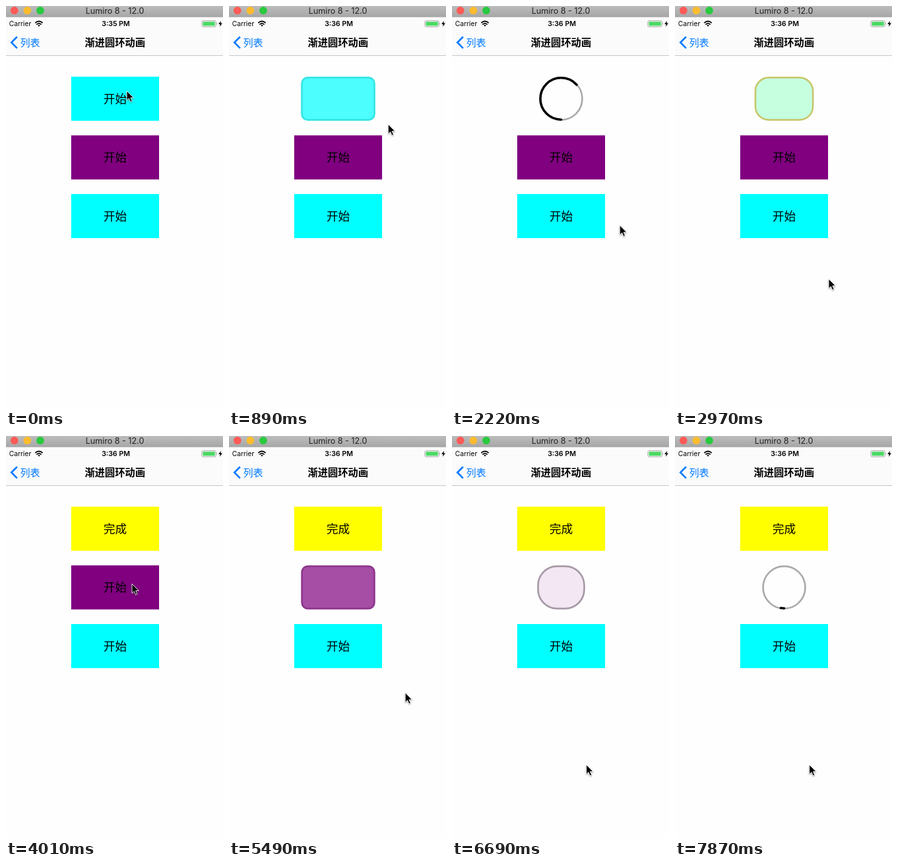
Animation of 336 by 620 pixels, one loop 8 s. Source, as an HTML page:

```html
<!DOCTYPE html>
<html lang="zh">
<head>
<meta charset="utf-8">
<style>
html, body { margin: 0; width: 100%; height: 100%; overflow: hidden; background: #fefefe; }
svg { display: block; width: 336px; height: 620px; }
text { font-family: Inter, "Noto Sans CJK SC", "Noto Sans CJK", sans-serif; text-anchor: middle; }
.label { font-size: 18px; }
#cursor { filter: drop-shadow(0 1px 1px #0006); }
</style>
</head>
<body>
<svg viewBox="0 0 336 620">
  <defs>
    <linearGradient id="bar" x2="0" y2="1">
      <stop stop-color="#bcbcbc"/><stop offset="1" stop-color="#a6a6a6"/>
    </linearGradient>
  </defs>
  <rect width="336" height="620" fill="#fefefe"/>

  <!-- window title -->
  <rect width="336" height="17.5" fill="url(#bar)"/>
  <circle cx="13" cy="7" r="6" fill="#fc5b57"/>
  <circle cx="33" cy="7" r="6" fill="#fdbc2f"/>
  <circle cx="53" cy="7" r="6" fill="#29c940"/>
  <text x="168.5" y="12" font-size="12.8" fill="#222">Lumiro 8 - 12.0</text>

  <!-- status and navigation bars -->
  <rect y="17.5" width="336" height="59" fill="#fbfbfb"/>
  <path d="M0 76.5H336" stroke="#c6c6c6"/>
  <text x="22" y="31" font-size="10.5">Carrier</text>
  <g fill="none" stroke="#000" stroke-width="1.8">
    <path d="M45.2 26.2Q51 20.8 56.8 26.2M47.3 28.6Q51 25.2 54.7 28.6"/>
    <path d="M49.2 29.8Q51 28.4 52.8 29.8L51 31.7Z" fill="#000" stroke="none"/>
  </g>
  <text id="clock" x="170" y="31" font-size="10.8" font-weight="600"></text>
  <rect x="303.2" y="22.7" width="22" height="9.4" rx="2.3" fill="none" stroke="#9a9a9a" stroke-width=".9"/>
  <rect x="304.8" y="24.2" width="18.8" height="6.4" rx="1" fill="#4cd964"/>
  <path d="M326.4 25.7Q328 27.3 326.4 29Z" fill="#9a9a9a"/>
  <path d="M333 22.8L329 28H331.6L330.8 32L335 26.6H332.3Z"/>
  <path d="M17.2 47.5L8.4 56.3L17.2 65.1" fill="none" stroke="#007aff" stroke-width="2.7"/>
  <text x="37.3" y="62" font-size="15.3" fill="#007aff">列表</text>
  <text x="168.7" y="62" font-size="15.6" font-weight="700">渐进圆环动画</text>

  <g id="buttons"></g>
  <path id="cursor" d="M0 0V14.6L3.4 11.5L5.8 17L8.3 15.9L5.9 10.6H10.6Z" stroke="#fff" stroke-width=".9"/>
</svg>
<script>
const LOOP = 8000, STEP = 148.5;
const SIZE = 68, BORDER = 2.7, CX = 169;
const CYAN = [0, 255, 255], PURPLE = [128, 0, 128], YELLOW = [255, 255, 0], GRAY = [170, 170, 170];
const $ = id => document.getElementById(id);

const buttons = [
  { y: 109, color: CYAN, press: 470, span: 1095, ring: 1500, ringSpan: 1000, grow: 2520 },
  { y: 199.5, color: PURPLE, press: 4355, span: 2950, ring: 7530, ringSpan: 2950, grow: Infinity },
  { y: 290, color: CYAN, press: Infinity, span: 1, ring: Infinity, ringSpan: 1, grow: Infinity }
];

// time, x, y of the pointer tip
const pointer = [
  [0, 187, 131], [440, 187, 131], [742, 268, 165], [1040, 225, 200], [1336, 172, 227],
  [1500, 172, 227], [1930, 270, 300], [2400, 238, 421], [2970, 238, 421], [3416, 245, 310],
  [3712, 207, 235], [4009, 195, 228], [4455, 195, 228], [4800, 304, 290], [5346, 273, 396],
  [5494, 273, 396], [6080, 208, 507], [LOOP, 208, 507]
];

const clamp = v => Math.min(1, Math.max(0, v));
const lerp = (a, b, p) => a + (b - a) * p;
const mix = (a, b, p) => a.map((v, i) => lerp(v, b[i], p));
const rgba = (c, a = 1) => `rgba(${c.map(Math.round)},${a})`;

// cubic-bezier(.42, 0, .58, 1)
function ease(x) {
  let lo = 0, hi = 1, s = .5;
  for (let i = 0; i < 20; i++) {
    const r = 1 - s;
    if (1.26 * r * r * s + 1.74 * r * s * s + s ** 3 < x) lo = s; else hi = s;
    s = (lo + hi) / 2;
  }
  return s * s * (3 - 2 * s);
}
const progress = (t, start, span) => t < start ? 0 : ease(clamp((t - start) / span));

function setAttrs(el, attrs) {
  for (const key in attrs) el.setAttribute(key, attrs[key]);
}
function add(tag, attrs) {
  const el = document.createElementNS("http://www.w3.org/2000/svg", tag);
  setAttrs(el, attrs);
  return $("buttons").appendChild(el);
}

for (const b of buttons) {
  const cy = b.y + SIZE / 2;
  b.box = add("rect", { y: b.y + BORDER / 2, height: SIZE - BORDER, "stroke-width": BORDER });
  b.arc = add("circle", {
    cx: CX, cy, r: 32.2, pathLength: 1, fill: "none", stroke: "#000",
    "stroke-width": 3.6, "stroke-linecap": "round", transform: `rotate(90 ${CX} ${cy})`
  });
  b.label = add("text", { x: CX, y: cy + 6.6, class: "label" });
}

function drawButton(b, t) {
  const growing = t >= b.grow;
  const p = growing ? 1 - progress(t, b.grow, b.span) : progress(t, b.press, b.span);
  const done = growing && p < .0001;
  const width = SIZE * (2 - p);
  const fill = growing ? mix(YELLOW, b.color, p) : b.color;
  setAttrs(b.box, {
    x: CX - width / 2 + BORDER / 2,
    width: width - BORDER,
    rx: Math.max(0, p * SIZE / 2 - BORDER / 2),
    fill: rgba(fill, 1 - p),
    stroke: rgba(mix(growing ? YELLOW : b.color, GRAY, p))
  });
  const arc = growing ? 0 : progress(t, b.ring, b.ringSpan);
  setAttrs(b.arc, { "stroke-dasharray": `${arc} 2`, visibility: arc > 0 ? "visible" : "hidden" });
  b.label.textContent = done ? "完成" : t < b.press ? "开始" : "";
}

function drawPointer(t) {
  const i = pointer.findIndex(k => k[0] > t);
  const a = pointer[i - 1], b = pointer[i];
  const [, x, y] = mix(a, b, (t - a[0]) / (b[0] - a[0]));
  setAttrs($("cursor"), { transform: `translate(${x} ${y})` });
}

function draw(now) {
  // the screen refreshes in even steps
  const t = Math.floor((now % LOOP + 6) / STEP) * STEP;
  $("clock").textContent = t < 590 ? "3:35 PM" : "3:36 PM";
  buttons.forEach(b => drawButton(b, t));
  drawPointer(t);
}

const begin = performance.now();
function tick() {
  draw(performance.now() - begin);
  requestAnimationFrame(tick);
}
tick();
</script>
</body>
</html>
```
